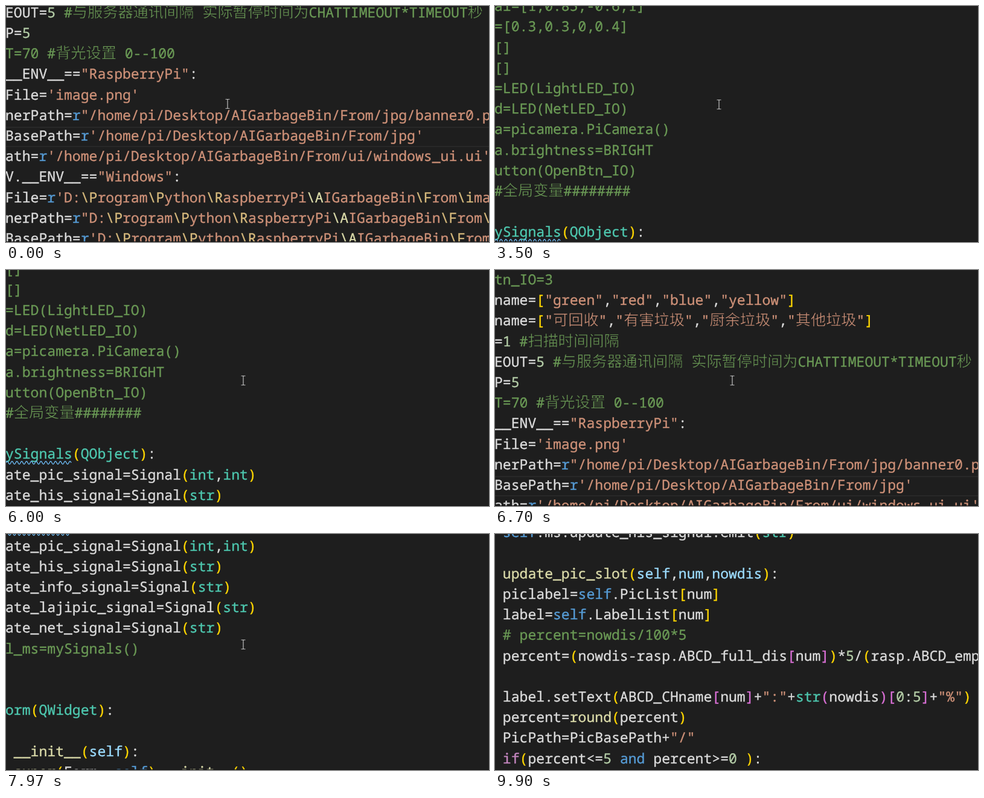
An HTML page for the animation above (9930 ms loop, 800 by 393 pixels).

```html
<!DOCTYPE html>
<html lang="zh-CN">
<head>
<meta charset="utf-8">
<title>Scrolling code</title>
<style>
html, body { margin: 0; width: 100%; height: 100%; overflow: hidden; background: #1e1e1e; }
#stage { position: relative; width: 800px; height: 393px; overflow: hidden; }
#stage::after { content: ""; position: absolute; left: 0; bottom: 0; width: 100%; height: 1px; background: #131313; }
#code {
  position: absolute; left: -1.2px; top: 0; color: #dcdcdc; white-space: pre;
  font: 23.1px "Noto Sans Mono", "DejaVu Sans Mono", monospace;
  -webkit-text-stroke: .35px currentColor;
  font-variant-ligatures: none; text-rendering: geometricPrecision; will-change: transform;
}
.line { position: absolute; left: 0; height: 34.2px; line-height: 31px; }
.current::before {
  content: ""; position: absolute; left: 0; top: 1px; width: 802px; height: 34.2px;
  box-sizing: border-box; border: solid #282828; border-width: 2px 0;
}
.guide::before { content: ""; position: absolute; left: 13.8px; top: 0; width: 1px; height: 34.2px; background: #404040; }
.cut { text-indent: -16.6px; }
.squiggle { position: absolute; left: 1px; top: 27px; fill: none; stroke: #6cb8f0; stroke-width: 1.4; }
i {
  font: 300 25.2px/0 "Noto Sans CJK SC Light", "Noto Sans CJK SC", "Noto Sans CJK", sans-serif;
  -webkit-text-stroke: .5px #1e1e1e;
}
.comment { color: #6a9955; }
.string { color: #ce9178; }
.escape { color: #d7ba7d; }
.prefix, .keyword { color: #569cd6; }
.control { color: #c586c0; }
.func, .anchor { color: #dcdcaa; }
.type { color: #4ec9b0; }
.param { color: #9cdcfe; }
.number { color: #b5cea8; }
.bracket0 { color: #ffd700; }
.bracket1 { color: #da70d6; }
#pointer { position: absolute; left: -4.5px; top: -9px; fill: none; stroke: #d0d0d0; stroke-width: 1.1; }
</style>
</head>
<body>
<div id="stage">
  <div id="code"></div>
  <svg id="pointer" width="9" height="17"><path d="M1 .8H3.6L4.5 1.6L5.4 .8H8M4.5 1.6V15.4M1 16.2H3.6L4.5 15.4L5.4 16.2H8"/></svg>
</div>
<script>
const LOOP = 9930, ROW = 34.2;
const home = "/home/pi/Desktop/AIGarbageBin/From";
const drive = String.raw`D:\Program\Python\RaspberryPi\AIGarbageBin\From`;
const emitLine = " self.ms.update_his_signal.emit(str)";

// First character: ~ commented out, @ function head, & class head.
const lines = [
  "~tn_IO=3",
  'name=["green","red","blue","yellow"]',
  'name=["可回收","有害垃圾","厨余垃圾","其他垃圾"]',
  "=1 #扫描时间间隔",
  "EOUT=5 #与服务器通讯间隔 实际暂停时间为CHATTIMEOUT*TIMEOUT秒",
  "P=5",
  "~T=70 #背光设置 0--100",
  '__ENV__=="RaspberryPi":',
  "File='image.png'",
  `nerPath=r"${home}/jpg/banner0.png"`,
  `BasePath=r'${home}/jpg'`,
  `ath=r'${home}/ui/windows_ui.ui'`,
  'V.__ENV__=="Windows":',
  `File=r'${drive}\\image.png'`,
  `nerPath=r"${drive}\\jpg\\banner0.png"`,
  `BasePath=r'${drive}\\jpg'`,
  `ath=r'${drive}\\ui\\windows_ui.ui'`,
  "", "", "", "", "",
  "~回收，1有害，2厨余湿垃圾，3其他干垃圾",
  "~Num=[0,1,2,3,3]#垃圾类别->舵机编号的映射",
  "~rNum=[2,3,0,1]#此舵机->对面舵机编号的映射",
  "~Val=[0.5,0.45,-0.15,0.5]",
  "~al=[1,0.85,-0.6,1]",
  "~=[0.3,0.3,0,0.4]",
  "~[]",
  "~[]",
  "~=LED(LightLED_IO)",
  "~d=LED(NetLED_IO)",
  "~a=picamera.PiCamera()",
  "~a.brightness=BRIGHT",
  "~utton(OpenBtn_IO)",
  "~#全局变量########",
  "",
  "&ySignals(QObject):",
  "ate_pic_signal=Signal(int,int)",
  ...["his", "info", "lajipic", "net"].map(s => `ate_${s}_signal=Signal(str)`),
  "~l_ms=mySignals()",
  "", "",
  "&orm(QWidget):",
  "",
  "@ __init__(self):",
  " super(Form, self).__init__()",
  " self.ui=QUiLoader().load(UiPath)",
  " self.ms=global_ms",
  " self.PicList=[]",
  " self.LabelList=[]",
  ...[..."ABCD"].map(c => ` self.PicList.append(self.ui.pic_${c})`),
  ...[..."ABCD"].map(c => ` self.LabelList.append(self.ui.label_${c})`),
  ...["pic", "his", "info", "lajipic", "net"].map(s => ` self.ms.update_${s}_signal.connect(self.update_${s}_slot)`),
  " self.ui.banner.setPixmap(QPixmap(BannerPath))",
  "",
  "@ update_net_slot(self,str):",
  " self.ui.net.setText(str)",
  "",
  "@ update_info_slot(self,str):",
  " self.ui.info.setText(str)",
  "",
  "@ update_lajipic_slot(self,str):",
  " pixmap=QPixmap(str)",
  " self.ui.lajipic.setPixmap(pixmap)",
  "",
  "@ update_his_slot(self,str):",
  " self.ui.history.append(str)",
  " self.ui.history.moveCursor(self.ui.history.textCursor().End)",
  "",
  "@ update_pic(self,num,nowdis):",
  " self.ms.update_pic_signal.emit(num,nowdis)",
  "",
  "@ update_his(self,str):",
  emitLine,
  "",
  "@ update_pic_slot(self,num,nowdis):",
  " piclabel=self.PicList[num]",
  " label=self.LabelList[num]",
  " # percent=nowdis/100*5",
  " percent=(nowdis-rasp.ABCD_full_dis[num])*5/(rasp.ABCD_empty_dis[num]-rasp.ABCD_full_dis[num])",
  "",
  ' label.setText(ABCD_CHname[num]+":"+str(nowdis)[0:5]+"%")',
  " percent=round(percent)",
  ' PicPath=PicBasePath+"/"',
  " if(percent<=5 and percent>=0 ):",
  "     PicPath+=str(percent)"
];

const grammar = rules => new RegExp(
  Object.entries(rules).map(([name, rule]) => `(?<${name}>${rule.source})`).join("|"), "g");
const bracket = /[()[\]]/;
const grammars = {
  "~": grammar({ comment: /.+/ }),
  "@": grammar({ func: /\w+(?=\()/, param: /\w+/, bracket }),
  "&": grammar({ type: /\w+/, bracket }),
  plain: grammar({
    comment: /#.*/,
    prefix: /\br(?=["'])/,
    string: /"[^"]*"|'[^']*'/,
    control: /\bif\b/,
    keyword: /\b(?:self|and)\b/,
    func: /\b(?:super|round|__init__)(?=\()/,
    type: /\b(?:str|int)\b/,
    number: /\b\d+(?:\.\d+)?\b/,
    bracket
  })
};

const span = (name, text) => `<span class="${name}">${text}</span>`;

function highlight(source) {
  const kind = /^[~@&]/.test(source) ? source[0] : "plain";
  const text = (kind === "plain" ? source : source.slice(1)).replace(/</g, "&lt;");
  let depth = 0;
  return text.replace(grammars[kind], (...args) => {
    const token = args[0], groups = args.at(-1);
    const name = Object.keys(groups).find(key => groups[key] !== undefined);
    if (name === "bracket") {
      const level = /[(\[]/.test(token) ? depth++ : --depth;
      return span("bracket" + level % 2, token);
    }
    const body = name === "string"
      ? token.replace(/\\./g, e => span(e === "\\A" ? "anchor" : "escape", e))
      : token;
    return span(name, body);
  }).replace(/[\u3000-\u9fff\uff00-\uffef]+/g, "<i>$&</i>");
}

const code = document.getElementById("code");
const pointer = document.getElementById("pointer");

lines.forEach((source, row) => {
  const line = document.createElement("div");
  line.className = "line";
  line.style.top = row * ROW + "px";
  line.innerHTML = highlight(source);
  if (source.startsWith("BasePath=r'/")) line.classList.add("current");
  if (source.startsWith("~回")) line.classList.add("cut");
  if (source.startsWith("     ")) line.classList.add("guide");
  if (source.startsWith("&ySignals")) {
    line.innerHTML += `<svg class="squiggle" width="109" height="8"><path d="M0 4q2 -5 4 0${"t4 0".repeat(26)}"/></svg>`;
  }
  code.append(line);
});

// Scroll bursts: first step, last step, number of steps, final offset.
const startScroll = 141.6;
const bursts = [
  [300, 300, 1, 276], [1370, 1370, 1, 410], [1770, 1770, 1, 544.5], [2030, 2030, 1, 657],
  [2600, 2600, 1, 785], [2870, 2870, 1, 913], [3070, 3130, 2, 1030], [3430, 3500, 2, 905],
  [3730, 3730, 1, 785], [4030, 4430, 6, 250], [4770, 4770, 1, 127.3], [4970, 5700, 16, 1096],
  [6000, 6000, 1, 974.5], [6030, 6230, 4, 488], [6570, 6700, 4, 0], [7030, 7130, 4, 490],
  [7400, 7500, 3, 854], [7830, 7970, 4, 1295.5], [8330, 8400, 3, 1660], [8700, 8870, 3, 2020],
  [9130, 9270, 4, 2500], [9600, 9900, 9, lines.indexOf(emitLine) * ROW + 19]
];

// Pointer positions: time, x, y.
const pointerStops = [
  [0, 366.5, 163.5], [100, 370.5, 163.5], [2270, 370.5, 164.5],
  [4430, 379.5, 164.5], [5300, 392.5, 184.5], [9600, -20, -20]
];

function scrollAt(time) {
  let offset = startScroll;
  for (const [first, last, steps, target] of bursts) {
    if (time < first) break;
    const progress = last > first ? (time - first) / (last - first) : 1;
    const done = Math.min(steps, Math.floor(progress * (steps - 1) + 1e-6) + 1);
    offset += (target - offset) * done / steps;
  }
  return offset;
}

function draw(now) {
  const time = Math.max(0, now) % LOOP;
  code.style.transform = `translateY(${-Math.round(scrollAt(time))}px)`;
  const [, x, y] = pointerStops.findLast(stop => stop[0] <= time);
  pointer.style.transform = `translate(${x}px, ${y}px)`;
}

function tick() {
  draw(performance.now());
  requestAnimationFrame(tick);
}
tick();
</script>
</body>
</html>
```
